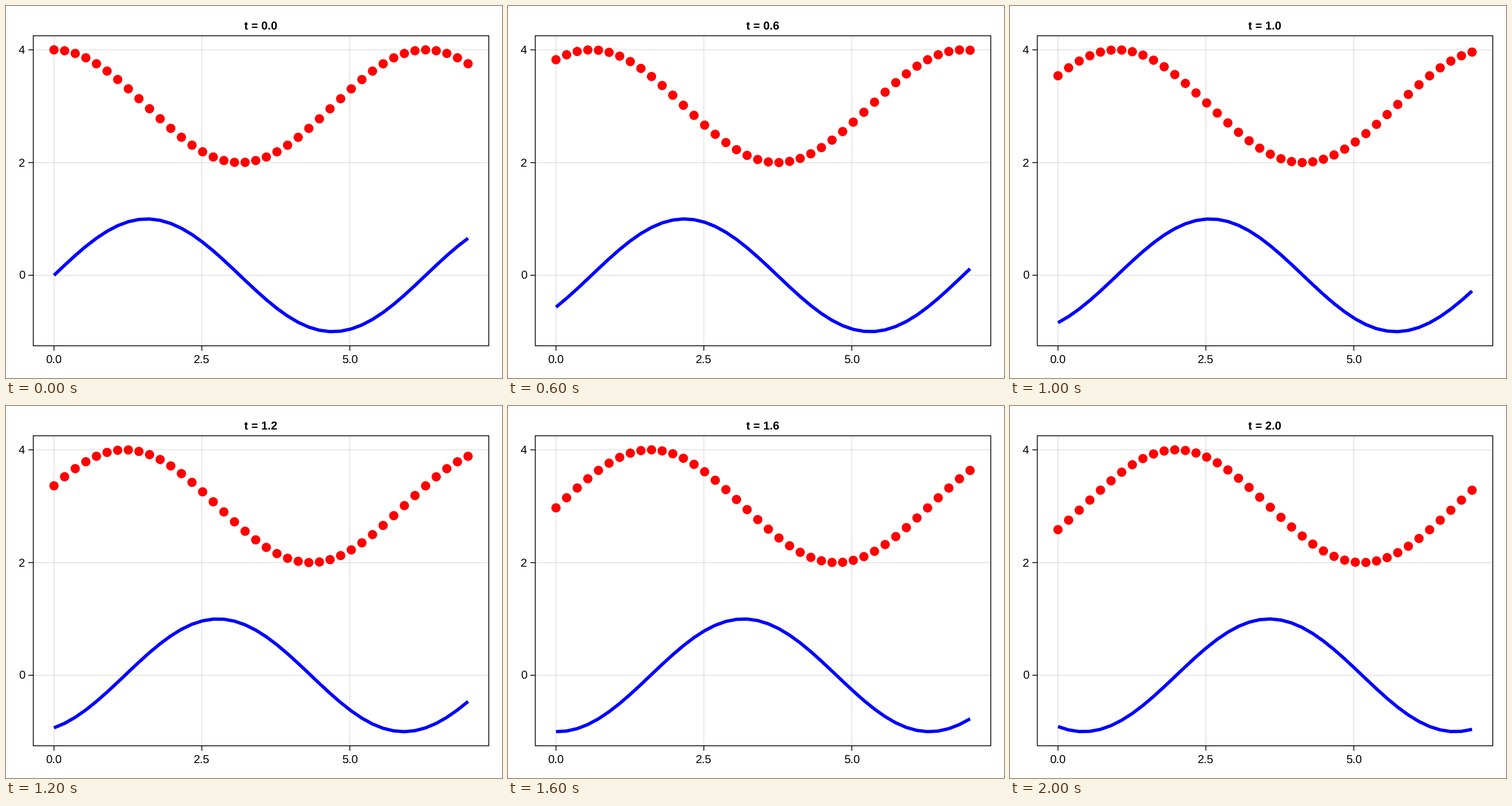
Animation of 864x648 px, one loop 2.1 s. Source, as a matplotlib script:

```python
import numpy as np
import matplotlib.pyplot as plt
from matplotlib.animation import FuncAnimation
from matplotlib.patches import Circle, Rectangle

plt.rcParams["font.family"] = "Liberation Sans"
plt.rcParams["path.snap"] = False
plt.rcParams["text.hinting"] = "none"

W, H = 864, 648
U = 1.44  # pixels per layout unit
FRAMES, INTERVAL = 21, 100

LEFT, RIGHT, TOP, BOTTOM = 33 * U, 584 * U, 36 * U, 411 * U
X0, X1, Y0, Y1 = -0.35, 7.35, -1.25, 4.25


def px(x):
    return LEFT + (x - X0) / (X1 - X0) * (RIGHT - LEFT)


def py(y):
    return BOTTOM - (y - Y0) / (Y1 - Y0) * (BOTTOM - TOP)


# At 72 dpi one point equals one pixel
fig = plt.figure(figsize=(W / 72, H / 72), dpi=72, facecolor="white")
ax = fig.add_axes([0, 0, 1, 1])
ax.set(xlim=(0, W), ylim=(H, 0))
ax.axis("off")


def stroke(xs, ys, color="black", width=U, **kw):
    return ax.plot(xs, ys, color=color, lw=width, solid_capstyle="butt",
                   solid_joinstyle="miter", **kw)[0]


def label(x, y, text, **kw):
    return ax.text(x, y, text, size=14 * U, ha="center", va="baseline", **kw)


for v in (0, 2.5, 5):
    x = px(v)
    stroke([x, x], [TOP, BOTTOM], alpha=0.12)
    stroke([x, x], [BOTTOM, BOTTOM + 6 * U])
    label(x, 623, f"{v:.1f}")

for v in (0, 2, 4):
    y = py(v)
    stroke([LEFT, RIGHT], [y, y], alpha=0.12)
    stroke([LEFT - 6 * U, LEFT], [y, y])
    label(27.6, y + 7, str(v))

ax.add_patch(Rectangle((LEFT, TOP), RIGHT - LEFT, BOTTOM - TOP, fill=False,
                       ec="black", lw=U, joinstyle="miter", zorder=3))

xs = np.linspace(0, 7, 40)
wave = stroke(px(xs), py(np.sin(xs)), "blue", 4 * U, zorder=4)
dots = [ax.add_patch(Circle((px(x), 0), 5.6 * U, fc="red", lw=0, zorder=5))
        for x in xs]
title = label((LEFT + RIGHT) / 2, 42, "", weight="bold")


def update(i):
    t = i / 10
    wave.set_ydata(py(np.sin(xs - t)))
    for dot, x in zip(dots, xs):
        dot.center = px(x), py(np.cos(x - t) + 3)
    title.set_text(f"t = {t:.1f}")
    return [wave, title, *dots]


anim = FuncAnimation(fig, update, frames=FRAMES, interval=INTERVAL,
                     repeat=True, repeat_delay=0)
plt.show()
```
